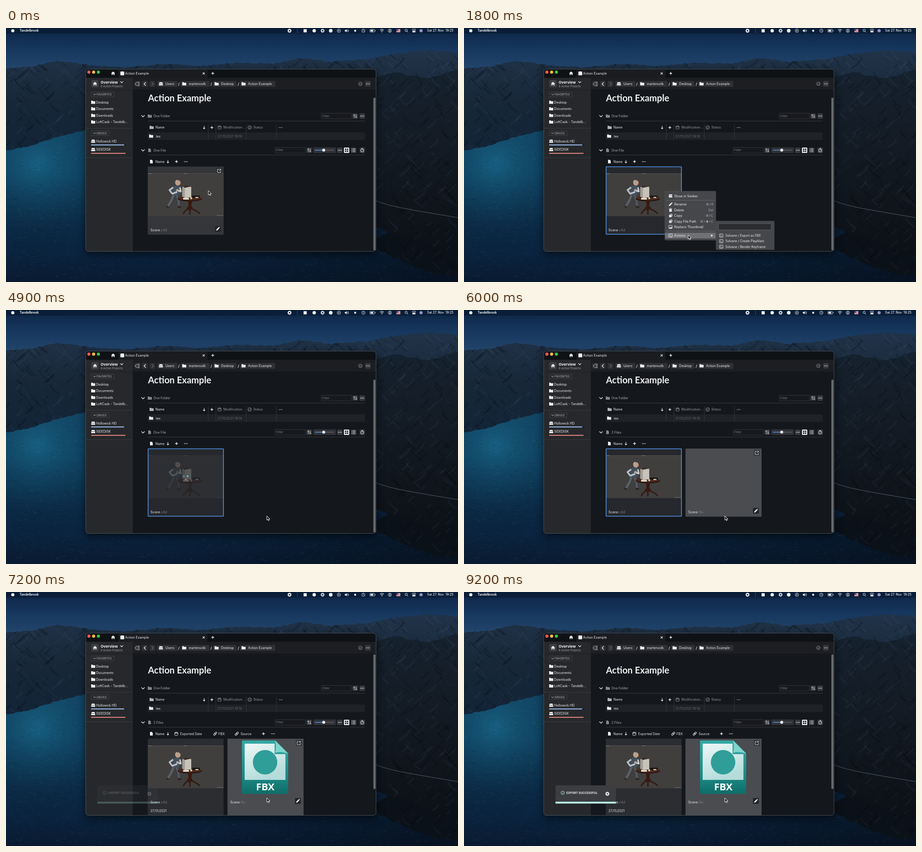
An HTML page with a canvas for the animation above (9300 ms loop, 998x561 px).

```html
<!DOCTYPE html>
<html lang="en">
<head>
<meta charset="utf-8">
<title>Export action</title>
<style>
  html, body { margin: 0; width: 100%; height: 100%; overflow: hidden; background: #0b1c31; }
  canvas, svg { position: absolute; left: 0; top: 0; width: 998px; height: 561px; display: block; }
  text { font-family: Inter, "DejaVu Sans", sans-serif; white-space: pre; }
  .title { font-family: Lato, sans-serif; }
  .type { font-family: "Open Sans", sans-serif; }
</style>
</head>
<body>
<canvas id="wall" width="998" height="561"></canvas>
<svg id="ui" viewBox="0 0 998 561"></svg>
<script>
const LOOP = 9300, STEP = 100;
const WHITE = '#f0f1f2', GREY = '#96989c', DIM = '#66696e', BTN = '#37393e', BLUE = '#4c94ea';

// ---------- wallpaper ----------
let seed = 11;
const rnd = () => (seed = (seed * 16807) % 2147483647) / 2147483647;
const g = document.getElementById('wall').getContext('2d');

function fade(x0, y0, x1, y1, ...colors) {
  const f = g.createLinearGradient(x0, y0, x1, y1);
  colors.forEach((c, i) => f.addColorStop(i / (colors.length - 1), c));
  return f;
}
function glow(x, y, r, color) {
  const f = g.createRadialGradient(x, y, 0, x, y, r);
  f.addColorStop(0, color);
  f.addColorStop(1, 'rgba(0,0,0,0)');
  g.fillStyle = f;
  g.fillRect(0, 0, 998, 561);
}
// Fills a rough ridge line closed along its last two points, then adds slope creases.
function land(points, fill, rough, creases) {
  g.save();
  g.beginPath();
  points.forEach(([x, y], i) => {
    if (!i) return g.moveTo(x, y);
    const [px, py] = points[i - 1], n = Math.ceil(Math.abs(x - px) / 6);
    for (let k = 1; k <= n; k++) {
      g.lineTo(px + (x - px) * k / n, py + (y - py) * k / n + (rnd() - .5) * rough);
    }
    if (!n) g.lineTo(x, y);
  });
  g.closePath();
  g.fillStyle = fill;
  g.fill();
  g.clip();
  for (let i = 0; i < creases; i++) {
    const x = rnd() * 998, y = 50 + rnd() * 500, s = rnd() < .5 ? -1 : 1, l = 6 + rnd() * 18;
    g.strokeStyle = rnd() < .6 ? 'rgba(2,6,13,.22)' : 'rgba(80,108,138,.1)';
    g.lineWidth = 1 + rnd() * 3;
    g.beginPath();
    g.moveTo(x, y);
    g.quadraticCurveTo(x + s * l * .3, y + l * .6, x + s * l, y + l);
    g.stroke();
  }
  g.restore();
}
function paintWall() {
  g.fillStyle = fade(0, 0, 0, 100, '#0d2444', '#17385f', '#25486d');
  g.fillRect(0, 0, 998, 561);
  g.fillStyle = fade(0, 200, 0, 561, '#164c70', '#10486b', '#0c2c4b', '#091a30');
  g.fillRect(0, 200, 998, 361);
  glow(70, 300, 210, 'rgba(28,112,146,.55)');
  g.fillStyle = fade(350, 0, 998, 0, 'rgba(5,13,25,0)', 'rgba(5,12,22,.6)');
  g.fillRect(0, 200, 998, 361);
  for (let i = 0; i < 3800; i++) {
    const y = 230 + rnd() * 331;
    g.fillStyle = rnd() < .5 ? 'rgba(100,165,205,.09)' : 'rgba(2,10,24,.16)';
    g.fillRect(rnd() * 998, y, 2 + rnd() * 6, .6 + rnd() * .9);
  }
  land([[0, 90], [60, 84], [115, 72], [170, 80], [260, 88], [340, 79], [430, 84], [510, 76], [590, 79],
    [650, 66], [720, 75], [800, 68], [870, 55], [930, 49], [998, 54], [998, 225], [176, 225], [110, 242], [50, 262], [0, 270]],
    fade(0, 60, 0, 270, '#203247', '#172738', '#122437'), 3, 1800);
  land([[700, 150], [800, 112], [860, 98], [930, 112], [998, 92], [998, 515], [930, 494], [870, 462], [815, 440]],
    fade(0, 90, 0, 510, '#16222f', '#141c26', '#10161d', '#0b1017'), 4, 1500);
  land([[800, 470], [850, 448], [900, 466], [960, 490], [998, 500], [998, 548], [950, 546], [890, 520], [830, 496]],
    '#0b1118', 6, 1100);
  g.strokeStyle = 'rgba(125,138,150,.5)';
  g.lineWidth = 1.2;
  g.beginPath();
  g.moveTo(816, 381);
  g.bezierCurveTo(850, 396, 900, 402, 998, 419);
  g.stroke();
  g.fillStyle = 'rgba(8,24,48,.6)';
  g.fillRect(0, 0, 998, 12.5);
}

// ---------- drawing helpers ----------
const text = (x, y, s, o = {}) => {
  const size = o.size || 7.15;
  return `<text x="${x}" y="${y + size * .36}" font-size="${size}" font-weight="${o.weight || 400}" fill="${o.fill || WHITE}" ` +
    `text-anchor="${o.anchor || 'start'}" class="${o.cls || ''}">${s}</text>`;
};
const rect = (x, y, w, h, fill, r = 0, stroke = 'none', sw = 1) =>
  `<rect x="${x}" y="${y}" width="${w}" height="${h}" rx="${r}" fill="${fill}" stroke="${stroke}" stroke-width="${sw}"/>`;
const path = (d, stroke = WHITE, sw = 1, fill = 'none') =>
  `<path d="${d}" fill="${fill}" stroke="${stroke}" stroke-width="${sw}" stroke-linejoin="round"/>`;
const shape = (d, fill) => path(d, 'none', 0, fill);
const dot = (x, y, r, fill = WHITE, stroke = 'none', sw = 1) =>
  `<circle cx="${x}" cy="${y}" r="${r}" fill="${fill}" stroke="${stroke}" stroke-width="${sw}"/>`;
const group = (id, body, attrs = '') => `<g id="${id}" ${attrs}>${body}</g>`;
const at = (x, y, body) => `<g transform="translate(${x} ${y})">${body}</g>`;
const hline = (x0, x1, y, c = '#393b3f') => path(`M${x0} ${y}H${x1}`, c);
const vline = (x, y0, y1, c = '#34363a') => path(`M${x} ${y0}V${y1}`, c);

// ---------- icons, centred on x, y ----------
const folder = (x, y, c = WHITE) => at(x, y, shape('M-4.5-3.5h3.3l1 1.2h4.7v5.8h-9z', c));
const drive = (x, y) => at(x, y, shape('M-3-3.5h6l1.4 3.2h-8.8zM-4.4.4h8.8v3h-8.8z', WHITE));
const file = (x, y, c = WHITE) => at(x, y, shape('M-3-4h3.7L3-1.7V4h-6z', c));
const house = (x, y) => at(x, y, shape('M0-4L4.4 0H3.2v3.7H1V1.2h-2v2.5h-2.2V0h-1.2z', WHITE));
const down = (x, y, r = 3.6, sw = 1.3) => path(`M${x - r} ${y - r / 2}l${r} ${r}l${r} ${-r}`, WHITE, sw);
const arrow = (x, y) => path(`M${x} ${y - 3.5}v6.5m-2.3-2.3l2.3 2.4l2.3-2.4`, WHITE, 1.1);
const plus = (x, y) => path(`M${x - 3} ${y}h6m-3-3v6`, WHITE, 1.4);
const cross = (x, y, r = 2.2, c = WHITE) => path(`M${x - r} ${y - r}l${2 * r} ${2 * r}m0 ${-2 * r}l${-2 * r} ${2 * r}`, c, 1.1);
const dots = (x, y, c = WHITE) => [-3, 0, 3].map(d => dot(x + d, y, .9, c)).join('');
const button = (x, y, fill = BTN) => rect(x - 6, y - 6, 12, 12, fill, 1.5);
const tick = (x, y, c = GREY) => dot(x, y, 3.8, 'none', c, .9) + path(`M${x - 1.8} ${y}l1.4 1.4l2.4-2.7`, c, .9);
const date = (x, y, c = GREY) => rect(x - 3.5, y - 3, 7, 6.6, 'none', 1, c, .9) + path(`M${x - 3.5} ${y - 1}h7m-5-3v2m3-2v2`, c, .9);
const link = (x, y) => `<g transform="translate(${x} ${y}) rotate(-45)">` + rect(-4.5, -1.7, 5, 3.4, 'none', 1.7, WHITE, 1) +
  rect(-.5, -1.7, 5, 3.4, 'none', 1.7, WHITE, 1) + '</g>';
const pencil = (x, y) => at(x, y, shape('M-4 4l.8-2.8L1.4-3.4l2 2-4.6 4.6zM2-4l.9-.7 1.8 1.8-.8.9z', WHITE));
const sort = (x, y) => button(x, y) + path(`M${x - 2} ${y + 3.5}v-7l-1.7 1.8m1.7-1.8l1.7 1.8M${x + 2} ${y - 3.5}v7l-1.7-1.8m1.7 1.8l1.7-1.8`, WHITE, .9);
const more = (x, y) => button(x, y) + dots(x, y);
const open = (x, y) => rect(x - 6, y - 6, 12, 12, '#222428', 1.5) +
  path(`M${x} ${y - 3.5}h-3.6v7.2h7.2v-3.6M${x - .5} ${y + .4}l4-4m-2.6-.1h2.8v2.8`, WHITE, 1);
const edit = (x, y) => rect(x - 6.5, y - 6.5, 13, 13, '#222428', 1.5) + pencil(x, y);
const script = (x, y) => rect(x - 3.8, y - 3.6, 7.6, 7.2, 'none', .8, WHITE, .9) + path(`M${x - 2} ${y - 1.6}l1.8 1.6l-1.8 1.6m2.2 0h2`, WHITE, .9);
const filter = (x, y) => rect(x, y - 6.2, 67, 12.4, '#17191d', 1, '#3f4146', .8) + text(x + 2.5, y, 'Filter', { fill: '#7a7c80', size: 6.8 });

// ---------- parts ----------
function menuBar() {
  const y = 6;
  return dot(15, y, 3.6) + text(30, y, 'Tandelbrook', { weight: 700, size: 6.9 }) +
    dot(626, y, 4.2) + rect(624.4, y - 1.6, 3.2, 3.2, '#12294a', .4) +
    [2.5, 6, 9.5].map(v => dot(643.5, v, .7, '#8392a6')).join('') +
    rect(657, 2.6, 7, 7, WHITE) + dot(680.5, y, 3.8) +
    dot(699, y, 2.6, 'none', WHITE, 1.7) + `<circle cx="699" cy="6" r="4" fill="none" stroke="${WHITE}" stroke-width="1" stroke-dasharray="1.6 1.54"/>` +
    dot(717, y, 4) +
    dot(735, y, 3.7, 'none', WHITE, .9) + shape('M733.9 4.2l3 1.8-3 1.8z', WHITE) +
    shape('M748 4.6h2l2.4-2v6.8l-2.4-2h-2z', WHITE) + path('M753.7 4q1.4 2 0 4m1.6-5.2q2.4 3.2 0 6.4', WHITE, .8) +
    rect(769, 4, 4, 4, WHITE) +
    dot(789, y, 3.5, 'none', WHITE, .9) + path('M789 3.8V6l1.6 1', WHITE, .8) +
    rect(803.5, 3, 10.5, 6, 'none', 1.3, WHITE, .8) + rect(804.8, 4.3, 6, 3.4, WHITE) + rect(814.8, 5, 1, 2, WHITE) +
    path('M825.8 4.6q4.2-3.6 8.4 0M827.4 6.5q2.6-2.1 5.2 0', WHITE, 1.1) + dot(830, 8.6, 1) +
    dot(847.5, y, 3.6, 'none', WHITE, .9) + dot(847.5, 5, 1.2) + shape('M845.2 8.3q2.3-2.8 4.6 0z', WHITE) +
    rect(862, 2.5, 8.5, 6.8, '#e9e4e6') + [2.5, 4.5, 6.5, 8.5].map(v => rect(862, v, 8.5, .9, '#c9394a')).join('') + rect(862, 2.5, 4, 3.6, '#34477f') +
    dot(883.5, 5.2, 2.5, 'none', WHITE, 1) + path('M885.3 7.2l2.4 2.4') +
    rect(897, 2.4, 7.4, 3, 'none', 1.5, WHITE, .9) + rect(897, 6.6, 7.4, 3, WHITE, 1.5) +
    dot(916.5, y, 3.6, '#9a8fc0') + text(988, y, 'Sat 27. Nov  19:25', { size: 6.9, weight: 500, anchor: 'end' });
}

function sidebar() {
  const head = (y, s, w) => rect(188.5, y - 5.2, w, 10.4, 'none', 0, '#45474b', .8) + down(195.5, y, 2.6, .9) + text(200, y, s, { size: 6.3, fill: '#b5b7ba' });
  const disk = (y, s, w, c) => drive(192.5, y) + text(199, y, s) + rect(188, y + 7.3, 78, 2, '#1a1b1e') + rect(188, y + 7.3, w, 2, c);
  return rect(176, 110, 104, 384, '#26282b') + hline(176, 280, 136.5, '#1c1e21') +
    rect(188.5, 115, 16, 16, '#3d3f43', 2) + house(196.5, 123) +
    text(209, 120, 'Overview', { size: 8.1, weight: 700 }) + down(255.5, 119.5, 3, 1.2) +
    text(209, 128.5, '8 Active Projects', { size: 6.1, fill: '#a3a5a8' }) + head(146.8, 'FAVORITES', 50) +
    ['Desktop', 'Documents', 'Downloads', 'LoftCask - Tandelb...'].map((s, i) => folder(192.5, 164 + 14.5 * i) + text(199, 164 + 14.5 * i, s)).join('') +
    hline(176, 280, 221.5, '#3a3c40') + head(232.3, 'DRIVES', 39) +
    disk(250, 'Hollowick HD', 73, '#a3c8fa') + disk(268.5, 'SIDEDISK', 76, '#ea8b82') + hline(176, 280, 286.5, '#3a3c40');
}

function toolbar() {
  const crumb = (x, w, s, ic) => rect(x, 117, w, 13, '#2e3034', 1.5) + ic(x + 8, 123.3) + text(x + 18, 123.5, s);
  return rect(280, 110, 537, 26, '#1c1e22') +
    rect(283.5, 117, 13, 13, '#2b2d31', 1.5) + path('M289 119.5l-4 4l4 4M290 120h5m-4 3.5h4m-5 3.5h5', WHITE, 1) +
    rect(300.5, 117, 12.5, 13, '#2e3034', 1.5) + path('M308.5 119.7l-3.7 3.8l3.7 3.8', WHITE, 1.3) +
    rect(317, 117, 12.5, 13, '#2e3034', 1.5) + path('M321.8 119.7l3.7 3.8l-3.7 3.8', '#6a6c70', 1.1) +
    crumb(334, 44.5, 'Users', drive) + crumb(385.5, 64, 'martenvolk', folder) + crumb(457, 52, 'Desktop', folder) + crumb(516.5, 78, 'Action Example', folder) +
    [381.5, 453, 513].map(x => text(x, 123.5, '/', { size: 8.5, weight: 600, anchor: 'middle' })).join('') +
    tick(782.5, 123.3, '#a8aaad') + more(799, 123.3);
}

function frame() {
  return rect(176, 91, 641, 402.5, '#14171b', 6) +
    `<g clip-path="url(#win)">${rect(176, 90, 641, 20, '#0f1215')}${rect(248, 92, 197, 18, '#1a1c20', 2)}${sidebar()}${toolbar()}</g>` +
    dot(183, 97.5, 3.4, '#fc5b56') + dot(193.5, 97.5, 3.4, '#fdbc40') + dot(204, 97.5, 3.4, '#34c648') +
    house(236.5, 100) + rect(252.5, 96, 8.5, 8.5, WHITE, 1.6) + text(263, 100.3, 'Action Example') + cross(436.5, 100.3) + plus(456.5, 100.3);
}

function scene() {
  return rect(313, 321, 167.5, 94.5, '#403f3e') + rect(313, 321, 167.5, 1, '#55534f') +
    rect(314, 321, 7, 1, '#8a8a88') + rect(393, 321, 7, 1, '#8a8a88') + rect(465, 413.5, 14, 1, '#777674') +
    path('M371 367L365 381L358 393', '#59616b', 4.5) + path('M376 368L381 382L382 394', '#4f5863', 4.5) +
    shape('M354 392l6 3-1 3-5-3zM379 393h6l3 4h-9z', '#2c2522') +
    shape('M368 350q9-5 18 1l-3 18h-14q-3-10-1-19z', '#42505c') +
    path('M369 352L361 358L367 366L378 362', '#b9c2c8', 3.6) + path('M384 352L386 361L376 358', '#c6cdd2', 3.4) +
    dot(379, 358, 2.4, '#c79a83') + dot(379.5, 342, 6, '#c29a86') + shape('M373.5 341q0-5 5-6-3 4-2 10z', '#aeaaa5') +
    '<ellipse cx="406" cy="377" rx="27" ry="6" fill="#28140f"/>' + '<ellipse cx="406" cy="375.6" rx="26" ry="5" fill="#4b2a20"/>' +
    shape('M402 381h9l-2 12 4 4-5 5h-5l-4-4 4-5z', '#38190f') +
    path('M404 399Q396 401 391 411M408 399Q418 401 428 410M406 400V412', '#351a12', 3.2) +
    shape('M389 352l6-3 14 2v23l-14 1-6-3z', '#c7c3b9') + shape('M389 352l6 1v22l-6-3z', '#a29e95') + shape('M391 351l5-3 12 2-13 3z', '#3a2a24') +
    rect(391, 375, 13, 4, '#dcd7ca', 1) + rect(411, 370, 17, 5, '#191615', 2) + dot(409, 376, 2.2, '#d9cfae') + rect(418, 373, 7, 2.6, '#d8cba4', 1);
}

function fbx() {
  return shape('M521 312q0-2 2-2h72l28 28v88q0 2-2 2h-98q-2 0-2-2z', 'url(#teal)') +
    shape('M527 317h66v23h24v57h-90z', 'url(#paper)') + shape('M594 310l29 29q-18-6-29-2q4-14 0-27z', '#7fd5cc') +
    dot(572, 358, 27, '#2f9e98') +
    text(572.5, 412, 'FBX', { size: 22, weight: 700, anchor: 'middle', cls: 'type', fill: '#fff' });
}

const name = (x, ext) => text(x, 446, `Scene<tspan fill="#7b7d82">.${ext}</tspan>`);

function content() {
  const sep = [446.5, 463.5, 530.5, 597];
  return text(313.5, 155, 'Action Example', { size: 20, weight: 700, cls: 'title' }) +
    down(302.5, 194.5) + folder(317.5, 194.5, '#85878b') + text(325.5, 194.8, 'One Folder', { fill: '#b0b2b5' }) +
    filter(696, 194.5) + sort(771, 194.5) + more(786.5, 194.5) + hline(313, 792.5, 205.5) +
    folder(321.5, 219.5, '#b5b7ba') + text(330, 219.8, 'Name') + arrow(437.5, 219.7) + plus(454.5, 219.7) +
    date(471.5, 219.5) + text(480, 219.8, 'Modification...', { fill: GREY }) + tick(538, 219.7, '#b0b2b5') + text(546, 219.8, 'Status', { fill: GREY }) + dots(606.5, 219.8, '#b0b2b5') +
    rect(313, 230.5, 479.5, 16.5, '#1f2226') + sep.map(x => vline(x, 213, 247)).join('') +
    folder(320.5, 238.8) + text(331, 239, 'tex') + text(467, 239, '27/11/2021 19:16', { fill: DIM }) +
    down(302.5, 270) + file(317, 270, '#85878b') + group('one', text(325.5, 270.3, 'One File', { fill: '#b0b2b5' })) + group('two', text(325.5, 270.3, '2 Files', { fill: '#b0b2b5' })) +
    filter(594, 270) + sort(669.5, 270) + rect(678.5, 263.5, 50, 12.5, '#303237', 1.5) + hline(700, 724, 269.8, '#77797d') +
    path('M682 269.8H702', BLUE, 1.6) + dot(701.5, 269.8, 3.2) + more(737, 270) +
    button(752, 270, '#e8e9ea') + [[-3.6, -3.6], [.6, -3.6], [-3.6, .6], [.6, .6]].map(([x, y]) => rect(752 + x, 270 + y, 3, 3, '#1d1f23')).join('') +
    button(767.5, 270) + path('M765.5 267h6m-6 3h6m-6 3h6M763 267h1.4m-1.4 3h1.4m-1.4 3h1.4', WHITE, 1) +
    button(786.5, 270) + dot(786.5, 270.5, 3.4, 'none', WHITE, 1) + path('M786.5 270.5l1.8-2M785 266h3', WHITE, 1) + hline(313, 792.5, 280.5) +
    file(321, 295) + text(330, 295.2, 'Name') + arrow(357.5, 295) +
    group('plain', plus(376.5, 295) + dots(397, 295.2)) +
    group('columns', date(376, 295, WHITE) + text(384.5, 295.2, 'Exported Date') + link(462, 295) + text(469, 295.2, 'FBX') +
      link(509.5, 295) + text(518, 295.2, 'Source') + plus(568.5, 295) + dots(589.5, 295.2)) +
    `<rect id="card" x="313" y="306" width="167.5" height="150.5"/>` + group('thumb', scene()) + name(319, 'c4d') +
    `<rect id="ring" x="313.7" y="306.5" width="166.4" height="149" rx="1" fill="none" stroke="${BLUE}" stroke-width="1.6"/>` +
    group('tools', open(470.5, 315.5) + edit(468, 443.5)) + group('spin', '') + group('stamp', text(319, 465, '27/11/2021')) +
    group('export', `<rect id="card2" x="489" y="306" width="168" height="150.5" fill="#4a4c50"/>` + group('icon', fbx()) + name(495, 'fbx') + open(646.5, 315.5) + edit(644.5, 443.5));
}

const rows = [371, 389.5, 402, 414.5, 427, 439.5, 458.5];
function menu() {
  const labels = ['Show in Seeker', 'Rename', 'Delete', 'Copy', 'Copy File Path', 'Replace Thumbnail', 'Actions'];
  const keys = ['', '⌘+R', 'Del', '⌘+C', '⌘+⬆+C', '', ''];
  const frames = y => rect(452.8, y - 1.8, 5.4, 5.4, WHITE, .5) + path(`M454.5 ${y - 3.3}h5v5`, WHITE, 1);
  const icons = [
    y => shape(`M453 ${y - 3.5}h7l-1 3h-7zM452 ${y + .3}h8v3h-8z`, WHITE), y => pencil(456, y),
    y => rect(453.2, y - 2, 5.6, 5.8, WHITE, .8) + path(`M452.6 ${y - 3.2}h6.8`), frames,
    y => frames(y) + path(`M454 ${y + 2.4}l2.6-3`, '#46484c', .8),
    y => rect(452.3, y - 3.5, 7.4, 7, 'none', .6, WHITE, .9) + shape(`M453 ${y + 3}l2-3 1.5 1.5 1.4-2.2 1.6 3.7z`, WHITE), y => script(456, y)];
  return rect(443.5, 360.5, 112.5, 108, '#45474b', 1.5, '#56585c', .6) + rect(444, 0, 111.6, 12.6, '#6f7174').replace('<rect', '<rect id="hover"') +
    hline(446, 554, 380.5, '#66686c') + hline(446, 554, 448.5, '#66686c') +
    rows.map((y, i) => icons[i](y) + text(464, y, labels[i]) + text(550.5, y, keys[i], { fill: '#a4a6a9', anchor: 'end' })).join('') +
    shape('M545.5 456l4.5 2.5-4.5 2.5z', WHITE);
}
function submenu() {
  return rect(556.5, 426.5, 128.5, 63, '#45474b', 1.5, '#56585c', .6) + rect(562, 432, 116.5, 14, '#2a2c30', 1, '#696b6f', .8) +
    group('caret', vline(564.5, 434.5, 444.5, WHITE)) + group('pick', rect(557, 452.2, 127.6, 12.6, '#6f7174')) +
    ['Export as FBX', 'Create Playblast', 'Render Keyframe'].map((s, i) => script(568, 458.5 + 12.3 * i) + text(577, 458.5 + 12.3 * i, 'Solvane / ' + s, { size: 6.9 })).join('');
}
function toast() {
  return rect(202, 427, 133.5, 40.5, '#3b3d41', 1.5) + rect(202, 463.2, 133.5, 4, '#b9f0e6') + tick(218, 443.5, '#b9f0e6') +
    text(226, 443.3, 'EXPORT SUCCESSFUL', { size: 6.25, weight: 700 }) + dot(316.5, 445.7, 4.3) + cross(316.5, 445.7, 1.6, '#33353a');
}

paintWall();
document.getElementById('ui').innerHTML = `<defs>
  <clipPath id="win"><rect x="176" y="91" width="641" height="402.5" rx="6"/></clipPath>
  <clipPath id="view"><rect x="280" y="136" width="537" height="357"/></clipPath>
  <linearGradient id="teal" x2="0" y2="1"><stop stop-color="#35aaa5"/><stop offset=".7" stop-color="#1b8782"/><stop offset="1" stop-color="#0f6c68"/></linearGradient>
  <linearGradient id="paper" x2=".4" y2="1"><stop stop-color="#eef7f7"/><stop offset="1" stop-color="#b3dcda"/></linearGradient>
  <filter id="soft" x="-10%" y="-10%" width="120%" height="125%"><feGaussianBlur stdDeviation="9"/></filter></defs>` +
  `<g filter="url(#soft)" opacity=".55">${rect(175, 97, 643, 404, '#000', 8)}</g>` + menuBar() + frame() +
  `<g clip-path="url(#view)">${group('content', content())}<rect id="bar" x="811.2" width="4.6" rx="1.5" fill="#696b6e"/></g>` +
  rect(176, 90.8, 641, 402.6, 'none', 6, '#5c6165', .8) + group('toast', toast()) + group('menus', menu() + group('sub', submenu())) +
  group('cursor', path('M0 0V9.4L2.2 7.4L3.7 10.6L5.2 9.9L3.8 6.9H6.6Z', '#fff', 1, '#0a0a0a'));

// ---------- timeline ----------
const el = {};
document.querySelectorAll('#ui [id]').forEach(n => el[n.id] = n);
const show = (id, on) => el[id].style.display = on ? '' : 'none';
const set = (id, attrs) => Object.entries(attrs).forEach(([k, v]) => el[id].setAttribute(k, v));

const pointer = [[0, 446.8, 359.3], [300, 446.8, 359.3], [800, 488.5, 455], [1000, 492, 456], [1300, 495, 457], [1900, 495, 457], [2300, 576, 454.8], [LOOP, 576, 454.8]];
function pointerAt(t) {
  const i = Math.max(1, pointer.findIndex(p => p[0] >= t));
  const [a, b] = [pointer[i - 1], pointer[i]], k = Math.max(0, (t - a[0]) / (b[0] - a[0]));
  return [a[1] + (b[1] - a[1]) * k, a[2] + (b[2] - a[2]) * k];
}

function render(t) {
  const selected = t >= 200 && t < 7100, busy = t >= 2600 && t < 5800;
  const made = t >= 6000, tagged = t >= 7100;
  set('cursor', { transform: `translate(${pointerAt(t)})` });

  show('menus', t >= 200 && t < 2700);
  set('menus', { opacity: t < 2500 ? 1 : t < 2600 ? .6 : .1 });
  const hy = pointerAt(t - STEP)[1], row = rows.find(y => Math.abs(y - hy) <= 6.4);
  show('hover', row || t > 800);
  set('hover', { y: (t > 800 ? rows[6] : row || 0) - 6.3 });
  show('sub', t >= 1100);
  show('caret', t < 1500 || t >= 2000);
  show('pick', t >= 2200);

  show('one', !made);
  show('two', made);
  show('export', made);
  show('icon', t >= 6300);
  show('plain', !tagged);
  show('columns', tagged);
  show('stamp', tagged);
  show('ring', selected);
  show('tools', t < 200);
  set('card', { fill: selected ? '#26282d' : t < 200 ? '#34363a' : '#2b2d31', height: tagged ? 220 : 150.5 });
  set('card2', { height: tagged ? 220 : 150.5 });
  set('thumb', { opacity: busy ? .3 : 1 });
  set('content', { transform: `translate(0 ${tagged ? 18 : 0})` });
  set('bar', tagged ? { y: 138, height: 297 } : { y: 154, height: 337 });

  show('spin', busy);
  if (busy) {
    el.spin.innerHTML = ['#4fa3ef', '#63e0b4', '#c35fb4'].map((c, i) => {
      const a = (t - 4900) / 1150 * 2 * Math.PI + (i * 2 / 3 - 5 / 6) * Math.PI;
      return dot(397 + 4.8 * Math.cos(a), 369.5 + 4.8 * Math.sin(a), 1.8, c);
    }).join('');
  }
  show('toast', t >= 7200);
  set('toast', { opacity: Math.min(1, (t - 7100) / 400) });
}

const start = performance.now();
function tickFrame() {
  const t = (performance.now() - start) % LOOP;
  render(Math.floor(t / STEP) * STEP);
  requestAnimationFrame(tickFrame);
}
tickFrame();
</script>
</body>
</html>
```
